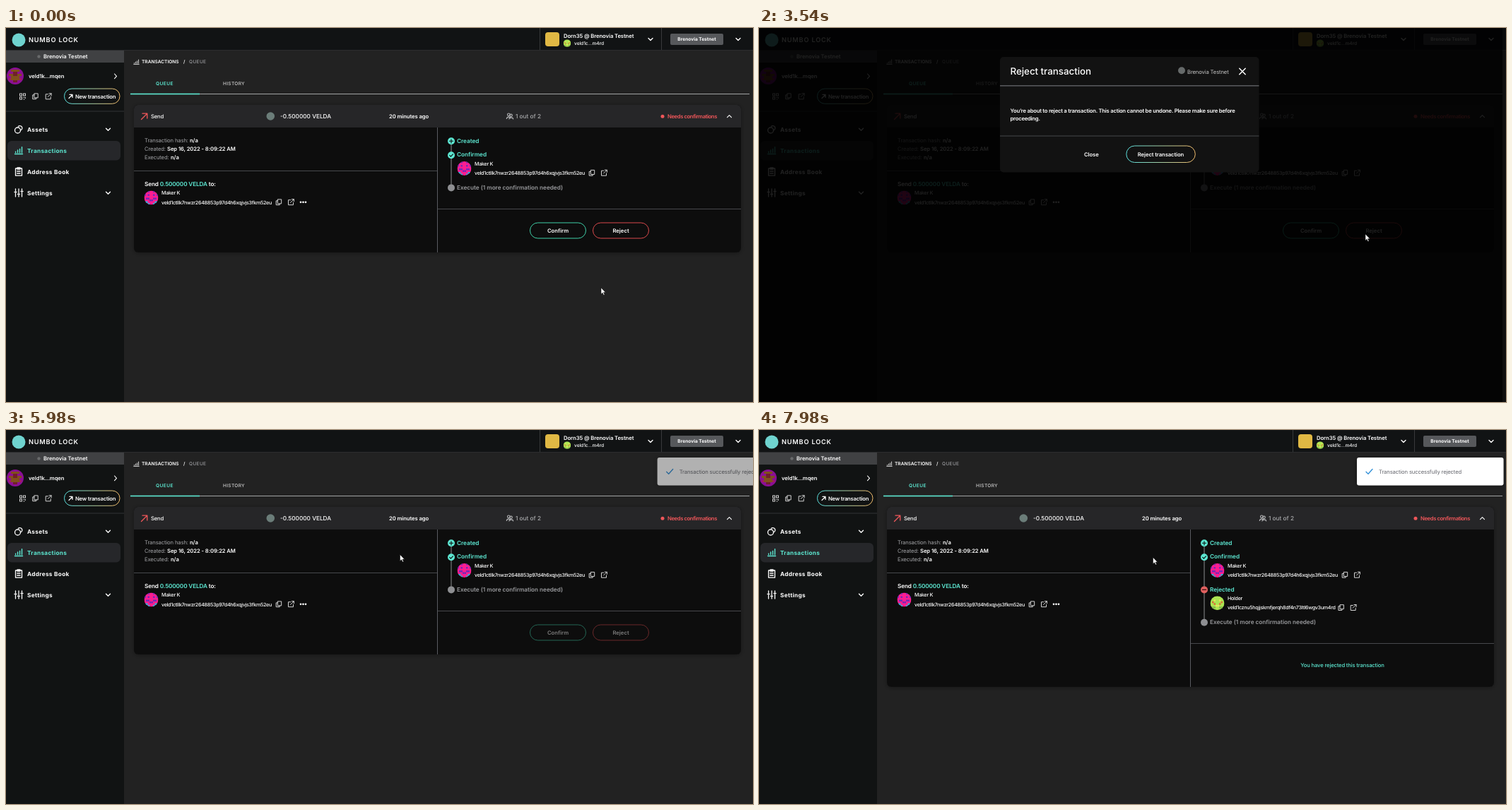
Recreate the animation shown at these times as an HTML page. Size 1057 by 530 pixels, loop 8000 ms.

```html
<!DOCTYPE html>
<html lang="en">
<head>
<meta charset="utf-8">
<title>Reject a queued transaction</title>
<style>
  html, body { margin: 0; width: 100%; height: 100%; overflow: hidden; background: #222; }
  svg { display: block; width: 100vw; height: 100vh; }
  text { font-family: Inter, "Liberation Sans", sans-serif; text-rendering: geometricPrecision; white-space: pre; }
</style>
</head>
<body>
<svg id="stage" viewBox="0 0 1057 530" preserveAspectRatio="none"></svg>
<script>
const TEAL = '#5de8d2', RED = '#f0575a', WHITE = '#fff', GREY = '#98999c';
const LOOP = 8000;
const stage = document.getElementById('stage');

// Type styles: size, weight, letter spacing
const STYLE = {
  body: [7.7, 400, -0.15], value: [7.7, 600, -0.1], tight: [7.7, 500, -0.18],
  alert: [7.7, 600, -0.4], note: [7.7, 600, -0.235], button: [7.7, 600, 0],
  step: [8.25, 600, -0.04], sum: [8.25, 600, -0.165], amount: [8.25, 500, 0],
  address: [7.15, 500, -0.29], nav: [8.25, 700, 0.3], caps: [6.6, 500, 0.32],
  tab: [6.6, 600, 0.4], crumb: [6.6, 600, 0], small: [6.6, 500, -0.03],
  tag: [6.6, 700, 0], title: [13.4, 550, -0.05], brand: [9.2, 600, 0.8]
};

// Text is placed by the vertical middle of its capitals.
function text(x, y, str, style, fill = WHITE, anchor = 'start') {
  const [size, weight, gap] = STYLE[style];
  return `<text x="${x}" y="${y + size * 0.36}" font-size="${size}" font-weight="${weight}" ` +
    `letter-spacing="${gap}" fill="${fill}" text-anchor="${anchor}">${str}</text>`;
}
const rect = (x, y, w, h, fill, r = 0, extra = '') =>
  `<rect x="${x}" y="${y}" width="${w}" height="${h}" rx="${r}" fill="${fill}" ${extra}/>`;
const circle = (x, y, r, fill) => `<circle cx="${x}" cy="${y}" r="${r}" fill="${fill}"/>`;
const path = (d, color, width = 1) =>
  `<path d="${d}" fill="none" stroke="${color}" stroke-width="${width}" stroke-linecap="round" stroke-linejoin="round"/>`;
const group = (id, inner) => `<g id="${id}">${inner}</g>`;
const at = (x, y, inner) => `<g transform="translate(${x} ${y})">${inner}</g>`;
const pill = (x, y, w, h, stroke) =>
  rect(x, y, w, h, 'none', h / 2, `stroke="${stroke}" stroke-width="1"`);

const chevron = (x, y) => path(`M${x - 3} ${y - 1.5}l3 3 3-3`, WHITE, 1.4);
const copyIcon = (x, y) => at(x, y,
  path('M-1.3-3.8h5v6h-5zM-1.3-1.8h-2.5v5.8h5v-1.8', '#d5d5d5', 1));
const linkIcon = (x, y) => at(x, y,
  path('M-.6-3h-3.2v7h7v-3.2M1-4h3.1v3.1M4-4l-4.8 4.8', '#d5d5d5', 1));
const barsIcon = (x, y, s, color) => at(x, y,
  path(`M${-5 * s} ${4.5 * s}h${10 * s}` + [2, 4, 5.5, 8].map((h, i) =>
    `M${(-4 + i * 2.7) * s} ${2.7 * s}v${-h * s + 1}`).join(''), color, 1.3 * s));

// A round avatar of mirrored blocks on an 8 by 8 grid: [x, y, width, height, colour]
let clips = 0;
function avatar(x, y, r, base, blocks) {
  const id = 'clip' + clips++;
  const cells = blocks.map(([bx, by, w, h, c]) =>
    rect(bx, by, w, h, c) + rect(8 - bx - w, by, w, h, c)).join('');
  return `<clipPath id="${id}"><circle cx="4" cy="4" r="4"/></clipPath>` +
    `<g transform="translate(${x - r} ${y - r}) scale(${r / 4})" clip-path="url(#${id})">` +
    rect(0, 0, 8, 8, base) + cells + '</g>';
}
const PURPLE = ['#8b0f94', [[2, 1, 2, 1, '#80501c'], [1, 3, 2, 1, '#80501c'], [3, 2, 1, 2, '#70202a'],
  [2, 4, 2, 2, '#80501c'], [1, 5, 1, 1, '#a31c60'], [3, 6, 1, 1, '#70202a']]];
const PINK = ['#fb1d90', [[0, 1, 1, 2, '#7727b8'], [2, 2, 1, 1, '#7727b8'], [1, 4, 2, 1, '#7727b8'],
  [3, 5, 1, 1, '#7727b8'], [2, 0, 1, 1, '#7727b8'], [0, 6, 2, 1, '#22b7dc'], [2, 7, 1, 1, '#22b7dc']]];
const LIME = ['#abe552', [[1, 3, 1, 1, '#dc6b36'], [2, 2, 1, 1, '#e9e55b'], [2, 4, 1, 1, '#dc6b36'],
  [3, 5, 1, 1, '#e9e55b'], [1, 6, 2, 1, '#83b94a']]];

const NET = 'Brenovia Testnet';
const ADDRESS = 'veld1ctllk7nwzr2648853p97d4h6xqjvjs3fkm52eu';
const OWN_ADDRESS = 'veld1cznu5hqjjskmfjerqh8df4n73ltl6wgv3um4rd';

function person(x, y, name, address, look, end) {
  return avatar(x, y, 10, ...look) + text(x + 14.5, y - 7, name, 'address') +
    text(x + 14.5, y + 6.5, address, 'address') + copyIcon(end, y + 6.2) + linkIcon(end + 17.3, y + 6.2);
}

function header() {
  return rect(0, 0, 1057, 31, '#111314') + rect(0, 31, 1057, 1, '#2c2d2f') +
    rect(755, 0, 1, 31, '#38393b') + rect(927, 0, 1, 31, '#38393b') +
    circle(18, 17, 9.5, '#6fd3cf') + text(32, 16.7, 'NUMBO LOCK', 'brand') +
    rect(763, 6, 20, 20, '#e0b844', 4) + text(789, 11, `Dorn35 @ ${NET}`, 'value') +
    avatar(794, 21.5, 5.3, ...LIME) + text(804, 21.5, 'veld1c...m4rd', 'small') + chevron(912, 16) +
    rect(940, 8, 75, 16, '#56585b', 2) + text(977.5, 16, NET, 'tag', WHITE, 'middle') + chevron(1036, 16);
}

function sidebar() {
  const dots = [[-4, -4], [1, -4], [-4, 1]].map(([x, y]) =>
    rect(x, y, 3, 3, 'none', 0, 'stroke="#d5d5d5"')).join('');
  return rect(0, 32, 167, 498, '#111313') + rect(0, 32, 167, 17, '#404143') +
    circle(46.5, 40.5, 2.2, '#686a6b') + text(53, 40.5, NET, 'button') +
    avatar(13, 68, 12, ...PURPLE) + text(32, 68.3, 'veld1k...mqen', 'value') +
    path('M153.5 65l3 3.3-3 3.3', WHITE, 1.1) +
    at(23.5, 97, dots + path('M1.5 1.5h1M4 1.5v1M1.5 4h1M4 4', '#d5d5d5')) +
    copyIcon(41.5, 96.7) + linkIcon(60, 96.8) +
    pill(82.5, 86, 78.5, 21.3, 'url(#glow)') + path('M89 99.5l5-5M90 94.4h4v4', WHITE, 1.2) +
    text(98, 96.8, 'New transaction', 'note') + rect(0, 117.5, 167, 1, '#333537') +
    rect(2, 160, 160, 27.5, '#26272a', 6) +
    `<g fill="none" stroke="#fff" stroke-width="1.3"><circle cx="16.5" cy="145" r="4"/><path d="M17 139.8a3.3 3.3 0 1 1 3.6 5.2"/></g>` +
    text(30, 143.6, 'Assets', 'nav') + chevron(144.5, 143.7) +
    barsIcon(18, 173.5, 1.1, TEAL) + text(30, 173.6, 'Transactions', 'nav', TEAL) +
    path('M13.5 199h9v10.2h-9zM16 198h4v2h-4zM15.7 203h4.5M15.7 206h4.5', WHITE, 1.3) +
    text(30, 203.6, 'Address Book', 'nav') +
    path('M13.5 228v3M13.5 234v5M18 228v6M18 237v2M22.5 228v2M22.5 233v6M12 232.5h3M16.5 235.5h3M21 231.5h3', WHITE, 1.3) +
    text(30, 233.6, 'Settings', 'nav') + chevron(144.5, 233.7);
}

function tabs() {
  return barsIcon(184.5, 48, 0.75, '#ddd') + text(192, 48, 'TRANSACTIONS', 'crumb') +
    text(251, 48, '/', 'crumb') + text(259, 48, 'QUEUE', 'caps', GREY) +
    text(212, 79, 'QUEUE', 'tab', TEAL) + text(307, 79, 'HISTORY', 'caps', '#d0d0d0') +
    rect(176, 93, 876, 1, '#a0a2a3') + rect(176, 92.7, 98, 1.6, TEAL);
}

function card(height, dividerY) {
  return rect(181, 109, 859, height, '#0b0b0c', 6, 'filter="url(#soft)"') +
    `<path d="M181 141v-26a6 6 0 0 1 6-6h847a6 6 0 0 1 6 6v26z" fill="#262628"/>` +
    rect(610, 141, 1, height - 32, '#5a5b60') + rect(611, dividerY, 429, 1, '#47484c');
}

function cardContent() {
  const row = (y, label, x, value) => text(196, y, label, 'body', '#a3a4a7') + text(x, y, value, 'value');
  return path('M191.5 129.5l8-8M193 121.2h6.8v6.8', RED, 1.3) + text(205, 125.3, 'Send', 'tight') +
    circle(374.3, 125, 5.8, '#6b7d79') + text(388, 125.2, '-0.500000 VELDA', 'amount') +
    text(542, 125, '20 minutes ago', 'value') +
    `<g fill="none" stroke="#b5b6b8" stroke-width="1.1"><circle cx="711.3" cy="122.8" r="1.8"/><circle cx="714.6" cy="123.8" r="1.7"/><path d="M708.3 129c0-3.7 5.5-3.7 5.8-.8M711.8 129.4c.2-3.4 5.7-3.4 5.9 0"/></g>` +
    text(721, 125, '1 out of 2', 'amount', '#a9aaac') +
    circle(929, 125.3, 2.5, RED) + text(936, 125.2, 'Needs confirmations', 'alert', RED) +
    path('M1020.5 126.6l3-3 3 3', WHITE, 1.1) +
    row(159.5, 'Transaction hash:', 260, 'n/a') + row(171.5, 'Created:', 228, 'Sep 16, 2022 - 8:09:22 AM') +
    row(183.6, 'Executed:', 233, 'n/a') + rect(181, 202, 429, 1, '#47484c') +
    text(196, 220.8, `Send <tspan fill="${TEAL}">0.500000 VELDA</tspan> to:`, 'sum') +
    person(205.5, 240.5, 'Maker K', ADDRESS, PINK, 386) +
    [417, 420.5, 424].map(x => circle(x, 246.8, 1.35, WHITE)).join('');
}

function steps(end) {
  return rect(629.5, 160, 1, end - 160, '#8c8d90') +
    circle(630, 160.3, 5, TEAL) + path('M627.4 160.3h5.2M630 157.7v5.2', '#0b0b0c', 1.1) +
    text(638, 159.8, 'Created', 'step', TEAL) +
    circle(630, 180.3, 5, TEAL) + path('M627.7 180.4l1.7 1.7 3-3.3', '#0b0b0c', 1.1) +
    text(638, 179.3, 'Confirmed', 'step', TEAL) +
    person(648.5, 199, 'Maker K', ADDRESS, PINK, 829) +
    circle(630, end, 5, '#8e8f92') +
    text(638, end - 0.4, 'Execute (1 more confirmation needed)', 'step', GREY);
}

function pending() {
  return card(209, 256) + steps(226.4) + group('actions',
    pill(741.5, 276, 79, 22, '#3fd0a8') + text(781, 287, 'Confirm', 'button', WHITE, 'middle') +
    pill(830.5, 276, 79, 22, '#d9494c') + text(870, 287, 'Reject', 'button', WHITE, 'middle'));
}

function rejected() {
  return card(255, 302) + steps(272.8) +
    circle(630, 226.4, 5, '#e0605f') + path('M627.4 226.4h5.2', '#3a1111', 1.1) +
    text(638, 225.9, 'Rejected', 'step', TEAL) +
    person(648.5, 245.3, 'Holder', OWN_ADDRESS, LIME, 823.7) +
    text(825.5, 333.6, 'You have rejected this transaction', 'tight', TEAL, 'middle');
}

function modal() {
  return rect(0, 0, 1052, 530, '#000', 0, 'opacity=".87"') + rect(1052, 0, 5, 530, '#000', 0, 'opacity=".55"') +
    rect(341, 41, 366.5, 163.5, '#121212', 5) +
    text(355.5, 61.3, 'Reject transaction', 'title') + circle(598, 60.3, 5, '#666a6a') +
    text(606, 62, NET, 'body', '#c4c4c4') + path('M679.8 57.3l8.4 8.4M688.2 57.3l-8.4 8.4', WHITE, 1.5) +
    rect(341, 81, 366.5, 1.6, '#56575a') + rect(341, 152.5, 366.5, 1, '#47484b') +
    text(355.5, 116.8, 'You’re about to reject a transaction. This action cannot be undone. Please make sure before', 'note') +
    text(355.5, 128.4, 'proceeding.', 'note') + text(470.3, 179, 'Close', 'value', WHITE, 'middle') +
    pill(519.8, 167, 97.5, 23.5, 'url(#glow)') +
    text(568.5, 179, 'Reject transaction', 'value', WHITE, 'middle');
}

const toast = () => rect(846, 39, 207.5, 39.5, WHITE, 3, 'filter="url(#soft)"') +
  path('M859 59.3l3 3 6-6.8', '#2f8fd8', 1.3) +
  text(877, 59, 'Transaction successfully rejected', 'body', '#66676e');

const arrow = `<path d="M0 0v9.2l2.1-1.9 1.5 3.3 1.5-.7-1.5-3.2h2.8z" fill="#fff" stroke="#000" stroke-width=".5"/>`;
const hand = `<path d="M-.8 1c0-1.4 1.9-1.4 1.9 0v3.2l3 .7c1 .2 1.4.8 1.3 1.8l-.6 3.2-.8 2.3h-4.4l-.5-1.4-2-3c-.6-1.1.6-1.8 1.3-1.1l.8.8z" fill="#fff" stroke="#000" stroke-width=".6"/>`;

stage.innerHTML = `<defs>
  <linearGradient id="glow"><stop stop-color="#5ae0de"/><stop offset="1" stop-color="#f3bd6c"/></linearGradient>
  <filter id="soft" x="-10%" y="-30%" width="120%" height="160%"><feDropShadow dx="0" dy="1" stdDeviation="3" flood-opacity=".35"/></filter>
  </defs>` +
  rect(0, 0, 1057, 530, '#222222') + header() + sidebar() + tabs() +
  group('pending', pending()) + group('rejected', rejected()) + cardContent() +
  group('toast', toast()) + group('modal', modal()) + group('click', circle(858, 292, 6.5, '#b9ad00')) +
  group('cursor', group('arrow', arrow) + group('hand', hand));

const el = id => document.getElementById(id);
const show = (id, on) => el(id).setAttribute('visibility', on ? 'inherit' : 'hidden');
const ease = p => p * p * (3 - 2 * p);
el('click').setAttribute('opacity', 0.85);

// Pointer strokes advance in even ticks, as in a screen capture.
const MOVES = [
  { from: 660, to: 1410, ticks: 12, x: 858, y: 292 },
  { from: 4020, to: 4780, ticks: 12, x: 557.5, y: 176.5 },
  { from: 7910, to: 7980, ticks: 2, x: 557.5, y: 180.5 }
];
const TOAST = { from: 5790, to: 6110, ticks: 5 };

function progress(t, { from, to, ticks }) {
  if (t < from) return 0;
  const tick = Math.floor((t - from) / (to - from) * (ticks - 1) + 0.001) + 1;
  return ease(Math.min(1, tick / ticks));
}
function pointer(t) {
  let x = 842, y = 368;
  for (const move of MOVES) {
    const p = progress(t, move);
    x += (move.x - x) * p;
    y += (move.y - y) * p;
  }
  return [x, y];
}

function update(t) {
  const [x, y] = pointer(t);
  const open = t >= 3540 && t < 5440;
  const overDialogButton = open && x < 617 && y > 167 && y < 190;
  const pointing = (t >= 1540 && t < 3540) || overDialogButton;
  const done = t >= 6250;
  el('cursor').setAttribute('transform', `translate(${x} ${y})`);
  show('hand', pointing);
  show('arrow', !pointing);
  show('click', t >= 3470 && t < 3540);
  show('modal', open);
  show('pending', !done);
  show('rejected', done);
  el('actions').setAttribute('opacity', t >= 5710 ? 0.45 : 1);
  const slide = progress(t, TOAST);
  show('toast', slide > 0);
  el('toast').setAttribute('transform', `translate(${(1 - slide) * 215} 0)`);
  el('toast').setAttribute('opacity', slide);
}

const start = performance.now();
function frame() {
  update((performance.now() - start) % LOOP);
  requestAnimationFrame(frame);
}
update(0);
requestAnimationFrame(frame);
</script>
</body>
</html>
```
